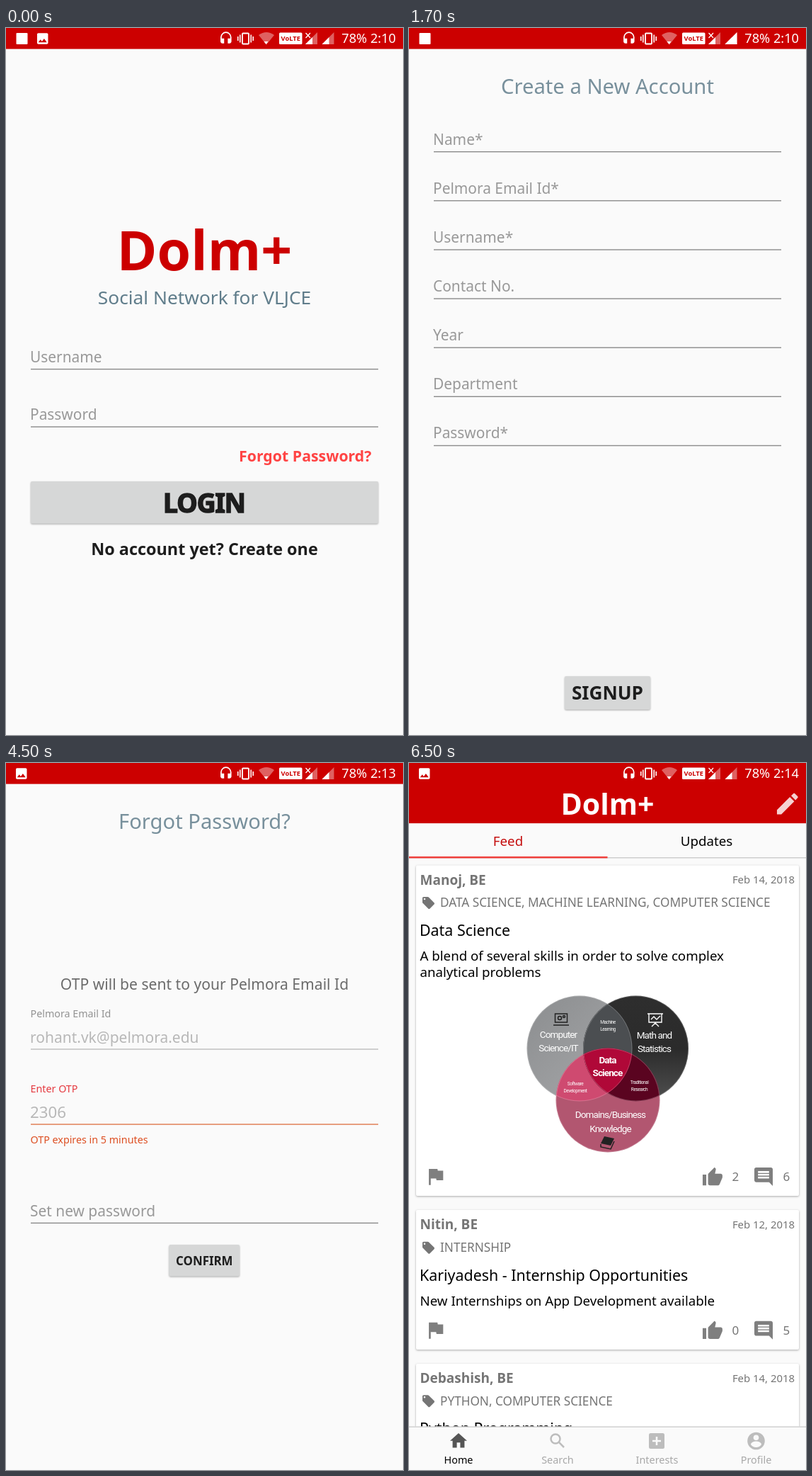
An HTML page that plays this animation: 561 px wide and 998 px high, repeating every 8 s.

```html
<!DOCTYPE html>
<html lang="en">
<head>
<meta charset="utf-8">
<title>Campus app screens</title>
<style>
html, body { margin: 0; width: 100%; height: 100%; overflow: hidden; background: #fafafa; }
svg.stage { display: block; width: 100%; height: 100%; }
text { font-family: "Noto Sans", "Open Sans", sans-serif; }
.mid { text-anchor: middle; }
.end { text-anchor: end; }
.bold { font-weight: 700; }

/* hard cuts between the five screens */
.screen { opacity: 0; animation: 8s step-end infinite; }
.login { animation-name: login; }
.signup { animation-name: signup; }
.forgot { animation-name: forgot; }
.otp { animation-name: otp; }
.feed { animation-name: feed; }
@keyframes login { 0% { opacity: 1 } 6.25%, 100% { opacity: 0 } }
@keyframes signup { 0% { opacity: 0 } 6.25% { opacity: 1 } 31.25%, 100% { opacity: 0 } }
@keyframes forgot { 0% { opacity: 0 } 31.25% { opacity: 1 } 56.25%, 100% { opacity: 0 } }
@keyframes otp { 0% { opacity: 0 } 56.25% { opacity: 1 } 81.25%, 100% { opacity: 0 } }
@keyframes feed { 0% { opacity: 0 } 81.25%, 100% { opacity: 1 } }

.clock { font-size: 18.2px; fill: #fff; text-anchor: end; }
.title { font-size: 29.2px; fill: #78909c; text-anchor: middle; }
.field { font-size: 20.9px; fill: #999; }
.note { font-size: 21.1px; fill: #6b6b6b; text-anchor: middle; }
.small { font-size: 14.3px; }
.value { fill: #b8b8b8; }
.line { fill: #8b8b8b; }
.btn { fill: #d6d7d7; filter: drop-shadow(0 1.5px 1.2px rgba(0,0,0,.32)); }
.label { font-weight: 700; fill: #1d1d1d; text-anchor: middle; }
.heavy { font-size: 37px; letter-spacing: -1px; stroke: #1d1d1d; stroke-width: 1.6px; }
.card { fill: #fff; filter: drop-shadow(0 1.5px 1.6px rgba(0,0,0,.32)); }
.grey { fill: #757575; }
.who { font-size: 19px; font-weight: 700; fill: #757575; }
.date { font-size: 14.9px; fill: #757575; text-anchor: end; }
.tags { font-size: 17.2px; fill: #757575; }
.head { font-size: 21.4px; }
.body { font-size: 18.7px; }
.count { font-size: 17px; fill: #757575; }
.tab { font-size: 18.7px; text-anchor: middle; }
.nav { font-size: 14.4px; text-anchor: middle; }
.venn text { font: 13.5px Roboto, "Liberation Sans", sans-serif; letter-spacing: -.9px; fill: #fff; text-anchor: middle; }
.venn .core { font-weight: 700; }
.venn .tiny { font-size: 6.6px; letter-spacing: -.5px; }
</style>
</head>
<body>
<svg class="stage" viewBox="0 0 561 998" preserveAspectRatio="none" xmlns="http://www.w3.org/2000/svg">
<defs>
  <path id="picture" fill="#fff" transform="translate(41.4 4.7) scale(.86)" d="M21 19V5c0-1.1-.9-2-2-2H5c-1.1 0-2 .9-2 2v14c0 1.1.9 2 2 2h14c1.1 0 2-.9 2-2zM8.5 13.5l2.5 3L14.5 12l4.5 6H5z"/>
  <path id="flag" d="M14.4 6L14 4H5v17h2v-7h5.6l.4 2h7V6z"/>
  <path id="thumb" d="M1 21h4V9H1zM23 10c0-1.1-.9-2-2-2h-6.3l1-4.6v-.3c0-.4-.2-.8-.5-1.1L14.2 1 7.6 7.6C7.2 8 7 8.5 7 9v10c0 1.1.9 2 2 2h9c.8 0 1.5-.5 1.8-1.2l3-7c.1-.3.2-.5.2-.8z"/>
  <path id="comment" d="M22 4c0-1.1-.9-2-2-2H4c-1.1 0-2 .9-2 2v12c0 1.1.9 2 2 2h14l4 4zM18 14H6v-2h12zM18 11H6V9h12zM18 8H6V6h12z"/>
  <path id="tag" class="grey" fill-rule="evenodd" d="M21.4 11.6l-9-9C12 2.2 11.5 2 11 2H4c-1.1 0-2 .9-2 2v7c0 .5.2 1 .6 1.4l9 9c.8.8 2 .8 2.8 0l7-7c.8-.8.8-2 0-2.8zM5.5 7a1.5 1.5 0 1 1 0-3 1.5 1.5 0 0 1 0 3z"/>
  <path id="pencil" d="M3 17.25V21h3.75L17.8 9.95 14.05 6.2zM20.7 7c.4-.4.4-1 0-1.4l-2.3-2.3c-.4-.4-1-.4-1.4 0l-1.85 1.8 3.75 3.75z"/>

  <g id="bar">
    <rect width="561" height="29.6" fill="#c00"/>
    <g fill="#fff">
      <path transform="translate(300.5 4.5) scale(.86)" d="M12 1a9 9 0 0 0-9 9v7c0 1.7 1.3 3 3 3h3v-8H5v-2a7 7 0 0 1 14 0v2h-4v8h3c1.7 0 3-1.3 3-3v-7a9 9 0 0 0-9-9z"/>
      <path d="M327 12h1.6v6h-1.6zM330 9.5h1.6v11h-1.6zM345.4 9.5h1.6v11h-1.6zM348.4 12h1.6v6h-1.6z"/>
      <rect x="334" y="7.5" width="9" height="15" rx="1" fill="none" stroke="#fff" stroke-width="1.8"/>
      <path d="M357 10Q368 2 379 10L368 23.5z" opacity=".38"/>
      <path d="M364.5 19h6l-3 4z"/>
      <rect x="386" y="6.5" width="32.5" height="16.5" rx="1.5"/>
      <path d="M440 6v17h-17z" opacity=".38"/>
      <path d="M433 13v10h-10z"/>
      <path d="M463.5 6v17h-17z" opacity=".38"/>
      <path d="M456.5 13v10h-10z"/>
    </g>
    <path d="M423.5 7l6.5 7M430 7l-6.5 7" stroke="#fff" stroke-width="1.3"/>
    <text class="mid bold" x="402.3" y="18.3" font-size="9.4" fill="#c00">VoLTE</text>
  </g>
  <rect id="mail" x="14.5" y="7" width="16" height="16" rx="1" fill="#fff"/>
  <rect id="rule" class="line" x="35" width="491" height="1.4"/>

  <g id="tools" class="grey" opacity=".92">
    <use href="#flag" transform="translate(21.3 -16.2) scale(1.35)"/>
    <use href="#thumb" transform="translate(413.7 -14.2) scale(1.27)"/>
    <use href="#comment" transform="translate(485.4 -15.4) scale(1.3)"/>
  </g>

  <clipPath id="inGrey"><circle cx="241" cy="403" r="74.5"/></clipPath>
  <clipPath id="inDark"><circle cx="320.5" cy="403" r="74.5"/></clipPath>
  <linearGradient id="greyFill" x1="0" y1="0" x2="1" y2="1">
    <stop offset="0" stop-color="#8b8d8f"/><stop offset="1" stop-color="#a9aaac"/>
  </linearGradient>
  <linearGradient id="darkFill" x1="0" y1="0" x2="0" y2="1">
    <stop offset="0" stop-color="#2e2e2e"/><stop offset=".5" stop-color="#2b2b2b"/><stop offset="1" stop-color="#505050"/>
  </linearGradient>
</defs>

<rect width="561" height="998" fill="#fafafa"/>

<g class="screen login">
  <use href="#bar"/><use href="#mail"/><use href="#picture"/>
  <text class="clock" x="551" y="21.3">78% 2:10</text>
  <text class="mid bold" x="280.5" y="342" font-size="77" fill="#c00">Dolm+</text>
  <text class="mid" x="280.5" y="390" font-size="26.3" fill="#607d8b">Social Network for VLJCE</text>
  <text class="field" x="34" y="471.5">Username</text>
  <use href="#rule" y="480.9"/>
  <text class="field" x="34" y="553">Password</text>
  <use href="#rule" y="562.3"/>
  <text class="end bold" x="516.5" y="612" font-size="21.3" fill="#ff4444">Forgot Password?</text>
  <rect class="btn" x="35" y="640" width="491" height="59.5" rx="2"/>
  <text class="label heavy" x="280" y="684">LOGIN</text>
  <text class="label" x="280.5" y="744" font-size="23.4">No account yet? Create one</text>
</g>

<g class="screen signup">
  <use href="#bar"/><use href="#mail"/>
  <path d="M463.5 6v17h-17z" fill="#fff"/>
  <text class="clock" x="551" y="21.3">78% 2:10</text>
  <text class="title" x="280.5" y="92.5">Create a New Account</text>
  <g class="field">
    <text x="34" y="164.7">Name*</text>
    <text x="34" y="233.8">Pelmora Email Id*</text>
    <text x="34" y="302.9">Username*</text>
    <text x="34" y="372">Contact No.</text>
    <text x="34" y="441.1">Year</text>
    <text x="34" y="510.2">Department</text>
    <text x="34" y="579.3">Password*</text>
  </g>
  <use href="#rule" y="174"/>
  <use href="#rule" y="243.1"/>
  <use href="#rule" y="312.3"/>
  <use href="#rule" y="381.4"/>
  <use href="#rule" y="450.5"/>
  <use href="#rule" y="519.6"/>
  <use href="#rule" y="588.8"/>
  <rect class="btn" x="220" y="915" width="121" height="47" rx="2"/>
  <text class="label" x="280.5" y="948" font-size="26.2">SIGNUP</text>
</g>

<g class="screen forgot">
  <use href="#bar"/><use href="#mail"/><use href="#picture"/>
  <text class="clock" x="551" y="21.3">78% 2:10</text>
  <text class="title" x="280.5" y="92.5">Forgot Password?</text>
  <text class="note" x="280.5" y="430">OTP will be sent to your Pelmora Email Id</text>
  <text class="field" x="34" y="504">Pelmora Email Id</text>
  <use href="#rule" y="513.5"/>
  <rect class="btn" x="229" y="532" width="102.5" height="44.5" rx="2"/>
  <text class="label" x="280.3" y="560.8" font-size="17.1">SEND OTP</text>
</g>

<g class="screen otp">
  <use href="#bar"/><use href="#picture" x="-30"/>
  <text class="clock" x="551" y="21.3">78% 2:13</text>
  <text class="title" x="280.5" y="92.5">Forgot Password?</text>
  <text class="note" x="280.5" y="320">OTP will be sent to your Pelmora Email Id</text>
  <text class="small" x="34.5" y="359" fill="#929292">Pelmora Email Id</text>
  <text class="value" x="34" y="395" font-size="21">rohant.vk@pelmora.edu</text>
  <rect x="35" y="403.3" width="491" height="1.4" fill="#bdbdbd"/>
  <text class="small" x="34.5" y="465.3" fill="#e53a40">Enter OTP</text>
  <text class="value" x="34" y="501" font-size="22.3">2306</text>
  <rect x="35" y="509.3" width="491" height="1.5" fill="#e08058"/>
  <text class="small" x="34.5" y="536.5" fill="#dd4f22">OTP expires in 5 minutes</text>
  <text class="field" x="34" y="639.5">Set new password</text>
  <use href="#rule" y="648.7"/>
  <rect class="btn" x="230.5" y="680" width="99.5" height="44.5" rx="2"/>
  <text class="label" x="280.3" y="708.8" font-size="16.9">CONFIRM</text>
</g>

<g class="screen feed">
  <use href="#bar"/>
  <rect y="29" width="561" height="56.1" fill="#c00"/>
  <use href="#picture" x="-30"/>
  <text class="clock" x="551" y="21.3">78% 2:14</text>
  <text class="mid bold" x="280.5" y="72.5" font-size="41" fill="#fff">Dolm+</text>
  <use href="#pencil" fill="#fff" opacity=".82" transform="translate(515 37.8) scale(1.65)"/>
  <rect y="133.2" width="561" height="1.2" fill="#c4c4c4"/>
  <rect y="131.9" width="280.5" height="2.5" fill="#f0403c"/>
  <text class="tab" x="140" y="117" fill="#c40c0c">Feed</text>
  <text class="tab" x="420.5" y="117">Updates</text>

  <rect class="card" x="10" y="144.5" width="541" height="466.5" rx="2"/>
  <text class="who" x="15.5" y="171.5">Manoj, BE</text>
  <text class="date" x="545" y="170">Feb 14, 2018</text>
  <use href="#tag" transform="translate(17.3 187.3) scale(.85)"/>
  <text class="tags" x="44" y="203.3">DATA SCIENCE, MACHINE LEARNING, COMPUTER SCIENCE</text>
  <text class="head" x="15" y="244">Data Science</text>
  <text class="body" x="15.5" y="279">A blend of several skills in order to solve complex</text>
  <text class="body" x="15.5" y="302">analytical problems</text>

  <g class="venn">
    <circle cx="241" cy="403" r="74.5" fill="url(#greyFill)"/>
    <circle cx="320.5" cy="403" r="74.5" fill="url(#darkFill)"/>
    <circle cx="281" cy="476" r="73.5" fill="#b25670"/>
    <g clip-path="url(#inGrey)">
      <circle cx="281" cy="476" r="73.5" fill="#cf4a70"/>
      <circle cx="320.5" cy="403" r="74.5" fill="#4b4e51"/>
    </g>
    <g clip-path="url(#inDark)">
      <circle cx="281" cy="476" r="73.5" fill="#5a0420"/>
      <g clip-path="url(#inGrey)"><circle cx="281" cy="476" r="73.5" fill="#b00838"/></g>
    </g>
    <g fill="none" stroke="#fff" stroke-opacity=".22">
      <circle cx="241" cy="403" r="74"/><circle cx="320.5" cy="403" r="74"/><circle cx="281" cy="476" r="73"/>
    </g>
    <g fill="none" stroke="#222" stroke-width="1.5">
      <path d="M206.5 354h17v12h-17zM204 370h22"/>
      <circle cx="213" cy="360" r="2.5"/><circle cx="219" cy="358" r="1.5"/>
    </g>
    <path d="M337 354h22M339 354v12h18v-12M348 366v3M348 367l-5 5M348 367l5 5M342 362l4-4 4 4 5-5" fill="none" stroke="#fff" stroke-width="1.4"/>
    <path d="M276 527l14 3-5 10-14-3z" fill="#222"/>
    <path d="M271 538v4l14 3 5-11" fill="none" stroke="#222" stroke-width="1.5"/>
    <text x="211" y="387.5">Computer</text>
    <text x="211" y="406.5">Science/IT</text>
    <text x="346.5" y="388.5">Math and</text>
    <text x="346.5" y="407.5">Statistics</text>
    <text class="core" x="280.5" y="424">Data</text>
    <text class="core" x="280.5" y="442">Science</text>
    <text x="284.5" y="500.5">Domains/Business</text>
    <text x="284.5" y="520.5">Knowledge</text>
    <text class="tiny" x="281" y="367.5">Machine</text>
    <text class="tiny" x="281" y="377.5">Learning</text>
    <text class="tiny" x="235" y="455">Software</text>
    <text class="tiny" x="235" y="464.5">Development</text>
    <text class="tiny" x="325.5" y="453">Traditional</text>
    <text class="tiny" x="325.5" y="462.5">Research</text>
  </g>
  <use href="#tools" y="583.7"/>
  <text class="count" x="456.5" y="590">2</text>
  <text class="count" x="528.5" y="590">6</text>

  <rect class="card" x="10" y="631" width="541" height="197" rx="2"/>
  <text class="who" x="15.5" y="658">Nitin, BE</text>
  <text class="date" x="545" y="656.5">Feb 12, 2018</text>
  <use href="#tag" transform="translate(17.3 674) scale(.85)"/>
  <text class="tags" x="44" y="690">INTERNSHIP</text>
  <text class="head" x="15" y="730.5">Kariyadesh - Internship Opportunities</text>
  <text class="body" x="15.5" y="765.5">New Internships on App Development available</text>
  <use href="#tools" y="800.5"/>
  <text class="count" x="456.5" y="807">0</text>
  <text class="count" x="528.5" y="807">5</text>

  <rect class="card" x="10" y="848" width="541" height="160" rx="2"/>
  <text class="who" x="15.5" y="875">Debashish, BE</text>
  <text class="date" x="545" y="873.5">Feb 14, 2018</text>
  <use href="#tag" transform="translate(17.3 890.5) scale(.85)"/>
  <text class="tags" x="44" y="906.5">PYTHON, COMPUTER SCIENCE</text>
  <text class="head" x="15" y="947">Python Programming</text>

  <rect y="936.5" width="561" height="61.5" fill="#fafafa"/>
  <rect y="936.5" width="561" height="1.2" fill="#c8c8c8"/>
  <path transform="translate(55.6 942.4) scale(1.2)" fill="#555" d="M10 20v-6h4v6h5v-8h3L12 3 2 12h3v8z"/>
  <g fill="none" stroke="#bdbdbd" stroke-width="2.5">
    <circle cx="207" cy="954" r="6.5"/><path d="M211.7 958.7l7.3 7.3"/>
  </g>
  <g fill="#bdbdbd">
    <rect x="339" y="946" width="22" height="22" rx="2.5"/>
    <circle cx="490.5" cy="957" r="12.3"/>
  </g>
  <path d="M350 951v12M344 957h12" stroke="#fafafa" stroke-width="2.5"/>
  <g fill="#fafafa">
    <circle cx="490.5" cy="952.3" r="3.8"/>
    <path d="M483 962c0-3 5-4.4 7.5-4.4s7.5 1.4 7.5 4.4a9 9 0 0 1-15 0z"/>
  </g>
  <text class="nav" x="70" y="989">Home</text>
  <g class="nav" fill="#a8a8a8">
    <text x="210" y="989">Search</text>
    <text x="350.5" y="989">Interests</text>
    <text x="490.5" y="989">Profile</text>
  </g>
</g>
</svg>
</body>
</html>
```
